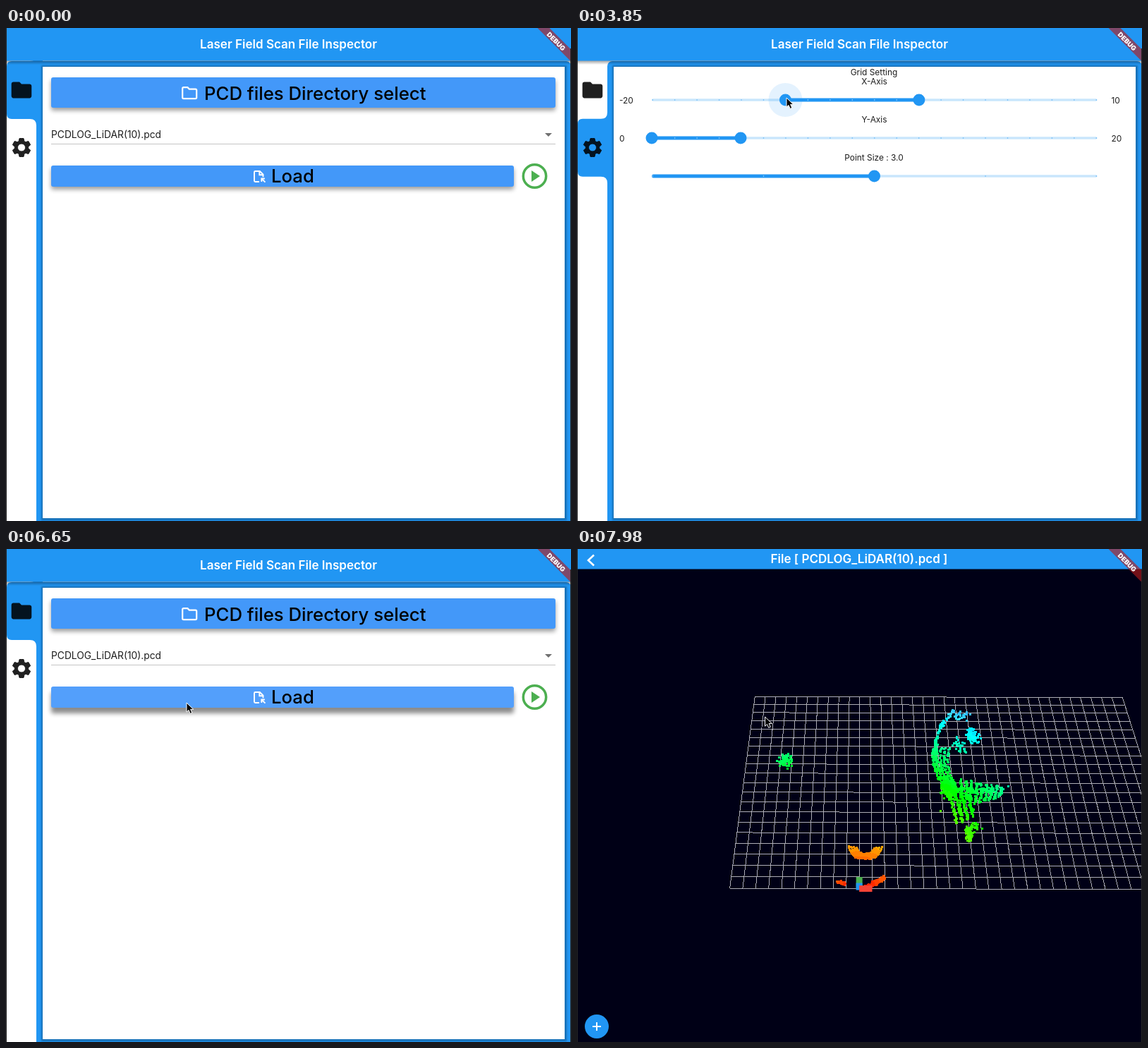
An HTML page that plays this animation: 801x699 px, repeating every 8 s.

```html
<!DOCTYPE html>
<html lang="en">
<head>
<meta charset="utf-8">
<title>Scan viewer</title>
<style>
  html, body { margin: 0; width: 100%; height: 100%; overflow: hidden; background: #fff; }
  svg { display: block; font-family: Inter, Roboto, sans-serif; }
  .mid { text-anchor: middle; }
  .bar { font-weight: 600; font-size: 17.05px; fill: #fff; }
  .big { font-weight: 500; font-size: 25.75px; }
  .small { font-size: 11.9px; fill: #1d1d1d; }
  .crisp { shape-rendering: crispEdges; }
</style>
</head>
<body>
<svg id="stage" width="801" height="699" viewBox="0 0 801 699">
  <defs>
    <filter id="soft" x="-5%" y="-60%" width="110%" height="260%"><feGaussianBlur stdDeviation="3"/></filter>
    <filter id="edge"><feGaussianBlur stdDeviation="1.3"/></filter>
    <linearGradient id="under" x1="0" y1="0" x2="0" y2="1">
      <stop offset="0" stop-color="#000" stop-opacity=".38"/>
      <stop offset="1" stop-color="#000" stop-opacity="0"/>
    </linearGradient>
  </defs>

  <g id="home">
    <rect width="801" height="699" fill="#fff"/>
    <rect x="43" y="47" width="758" height="670" rx="7" fill="#2196f3"/>
    <path id="tab" fill="#2196f3"/>
    <circle id="press" cx="28" cy="112" r="20" opacity=".07"/>
    <g opacity=".87">
      <path transform="translate(4.8 70.8) scale(1.43)" d="M10 4H4C2.9 4 2 4.9 2 6V18C2 19.1 2.9 20 4 20H20C21.1 20 22 19.1 22 18V8C22 6.9 21.1 6 20 6H12Z"/>
      <path id="gear" transform="translate(22 169.5)" fill-rule="evenodd" stroke="#000" stroke-width="1" stroke-linejoin="round"/>
    </g>
    <rect x="52" y="55" width="741" height="641" fill="none" stroke="#000" stroke-opacity=".26" stroke-width="4" filter="url(#edge)"/>
    <rect x="52" y="55" width="740" height="640" fill="#2196f3"/>

    <g id="pages">
      <g id="files">
        <rect x="52" y="55" width="740" height="640" fill="#fff"/>
        <rect x="64" y="74" width="715" height="43" rx="3" opacity=".38" filter="url(#soft)"/>
        <rect x="64" y="70" width="715" height="43" rx="3" fill="#4398f9"/>
        <path d="M250.2 85.8q0-1.6 1.6-1.6h5.6l2.4 2.4h8.8q1.6 0 1.6 1.6v10.4q0 1.6-1.6 1.6h-16.8q-1.6 0-1.6-1.6z" fill="none" stroke="#fff" stroke-width="2.2"/>
        <text class="big" x="281" y="101.5">PCD files Directory select</text>
        <text x="64" y="156" font-size="13.8" fill="#1d1d1d">PCDLOG_LiDAR(10).pcd</text>
        <rect x="64" y="164" width="715" height="1" fill="#c4c4c4"/>
        <path d="M764 149h10l-5 5z" fill="#707070"/>
        <rect id="loadShade" x="64" y="199" width="656" height="30" rx="3" filter="url(#soft)"/>
        <rect id="load" x="64" y="195" width="656" height="30" rx="3"/>
        <path d="M359 218h-5.6q-1.4 0-1.4-1.4v-12.2q0-1.4 1.4-1.4h6.4l4.7 4.7v3.6M359.3 203.5v4.7h4.7M367.5 218.7l-4.9-4.9M362.3 218v-4.5h4.6" fill="none" stroke="#fff" stroke-width="1.9"/>
        <text class="big" x="376" y="219.4">Load</text>
        <circle cx="749.5" cy="210" r="16.2" fill="none" stroke="#4caf50" stroke-width="3.5"/>
        <path d="M745 202v16l12-8z" fill="#4caf50"/>
      </g>
      <g id="settings">
        <rect x="52" y="55" width="740" height="640" fill="#fff"/>
        <g class="small">
          <g class="mid">
            <text x="421" y="66.7">Grid Setting</text>
            <text x="421.5" y="80.3">X-Axis</text>
            <text x="421.5" y="134.3">Y-Axis</text>
            <text x="421" y="188.3">Point Size : 3.0</text>
          </g>
          <text id="low" x="60" y="107.3"></text><text x="757.5" y="107.3">10</text>
          <text x="60" y="161.3">0</text><text x="757.5" y="161.3">20</text>
        </g>
        <g id="sliders"></g>
      </g>
    </g>
    <rect x="0" y="46" width="801" height="6" fill="url(#under)"/>
    <rect width="801" height="46.5" fill="#2196f3"/>
    <text class="bar mid" x="400.5" y="28.7">Laser Field Scan File Inspector</text>
  </g>

  <g id="viewer">
    <rect width="801" height="699" fill="#000016"/>
    <path id="grid" class="crisp" fill="none" stroke="#fff" stroke-opacity=".68"/>
    <g id="cloud" class="crisp"></g>
    <g id="axes"></g>
    <rect width="801" height="28.5" fill="#2196f3"/>
    <path d="M24 8.5L16 16l8 7.5" fill="none" stroke="#fff" stroke-width="2.6"/>
    <text class="bar mid" x="400" y="19.7">File [ PCDLOG_LiDAR(10).pcd ]</text>
    <circle cx="28" cy="677" r="17" fill="#2196f3"/>
    <path d="M22 677h12M28 671v12" stroke="#fff" stroke-width="2"/>
  </g>

  <path d="M753.5 0h17L801 30.5v17z" fill="#b71c1c" fill-opacity=".63"/>
  <text class="mid" transform="translate(780 19) rotate(45)" y="3.4" font-size="9.4" font-weight="900" fill="#fff">DEBUG</text>
  <path d="M.5 0V699M800.5 29V699" stroke="#262626"/>
  <path id="cursor" d="M0 0V13.2L3 10.4L5.2 15.4L7.8 14.3L5.6 9.4H9.8Z" stroke="#fff"/>
</svg>
<script>
const LOOP = 8000, BLUE = '#2196f3';
const $ = id => document.getElementById(id);
const clamp = v => Math.max(0, Math.min(1, v));
const ramp = (t, a, b) => clamp((t - a) / (b - a));
const smooth = u => u * u * (3 - 2 * u);
const mix = (a, b, u) => a + (b - a) * u;
const show = (el, on) => el.setAttribute('visibility', on ? 'visible' : 'hidden');

function set(el, attrs) {
  for (const k in attrs) el.setAttribute(k, attrs[k]);
  return el;
}
const add = (parent, tag, attrs) =>
  parent.appendChild(set(document.createElementNS('http://www.w3.org/2000/svg', tag), attrs));

// Gear icon: six teeth around a ring
function gearPath() {
  const pts = [];
  for (let i = 0; i < 6; i++)
    for (const a of [-23, -13, 13, 23]) {
      const q = (i * 60 - 90 + a) * Math.PI / 180, r = Math.abs(a) > 20 ? 9.8 : 13.3;
      pts.push(`${(r * Math.cos(q)).toFixed(2)} ${(r * Math.sin(q)).toFixed(2)}`);
    }
  return `M${pts.join('L')}ZM-5.5 0a5.5 5.5 0 1 0 11 0a5.5 5.5 0 1 0 -11 0Z`;
}
$('gear').setAttribute('d', gearPath());

// Sliders
const X0 = 106, X1 = 737.5;
const valueX = v => mix(X0, X1, (v + 50) / 100);

function slider(y, from, to, steps, single) {
  const g = $('sliders');
  add(g, 'rect', { x: X0, y: y - 1.75, width: X1 - X0, height: 3.5, rx: 1.7, fill: BLUE, opacity: .24 });
  const bar = add(g, 'rect', { y: y - 2.5, height: 5, rx: 2.5, fill: BLUE });
  const ticks = [];
  for (let i = 0; i <= steps; i++)
    ticks.push(add(g, 'circle', { cx: mix(X0 + 1.2, X1 - 1.2, i / steps), cy: y, r: .8 }));
  const halo = add(g, 'circle', { cy: y, fill: BLUE });
  const thumb = add(g, 'circle', { cy: y, r: 8.5, fill: BLUE });
  if (!single) add(g, 'circle', { cx: to, cy: y, r: 8.5, fill: BLUE });

  const update = (x, glow) => {
    set(bar, { x, width: to - x });
    set(thumb, { cx: single ? to : x });
    set(halo, { cx: x, r: 10 + 14 * glow, opacity: .12 * glow });
    for (const el of ticks) {
      const tx = +el.getAttribute('cx'), on = tx > x - 1 && tx < to;
      set(el, { fill: on ? '#fff' : BLUE, opacity: .63 });
    }
  };
  update(from, 0);
  return update;
}
const setX = slider(102, valueX(-10), valueX(10), 20);
slider(156, X0, 232, 20);
slider(210, X0, 421.5, 4, true);

// Point cloud, laid out in front-view pixels
let seed = 11;
const rnd = () => (seed = (seed * 16807) % 2147483647) / 2147483647;
const gauss = () => rnd() + rnd() + rnd() + rnd() - 2;
const UNIT = 16.87, DIST = 50.6, PIVOT = 7.56, MID = { x: 400.5, y: 365.1 };
const ORIGIN_Y = MID.y + PIVOT * UNIT;
const layers = new Map();

function dot(px, py) {
  const x = (px - MID.x) / UNIT, y = (ORIGIN_Y - py) / UNIT;
  const z = py < 425 && px > 450 ? (335 - py) / 190 + gauss() * .15 : 0;
  const hue = Math.round(Math.hypot(x, y) * 2) * 5;
  if (!layers.has(hue))
    layers.set(hue, { pts: [], el: add($('cloud'), 'path', { fill: `hsl(${hue},100%,${hue > 185 ? 60 : 50}%)` }) });
  layers.get(hue).pts.push([x, y, z]);
}

// Scatter n dots along a line that sags sideways by bend
function strand(x0, y0, x1, y1, bend, n, spread) {
  for (let i = 0; i < n; i++) {
    const u = rnd();
    dot(mix(x0, x1, u) + bend * 4 * u * (1 - u) + gauss() * spread, mix(y0, y1, u) + gauss() * spread);
  }
}
function blob(x, y, sx, sy, n) {
  for (let i = 0; i < n; i++) dot(x + gauss() * sx, y + gauss() * sy);
}

strand(546, 196, 515, 275, -10, 95, 2.4);
for (let i = 0; i < 5; i++) strand(511 + i * 6, 264, 523 + i * 4, 330, -6, 62 - i * 7, 1.3);
for (let i = 0; i < 4; i++) strand(529 + i * 8, 340, 537 + i * 8, 390 - i * 3, 1, 58 - i * 7, 1.6);
for (let i = 0; i < 9; i++) {
  const x = 544 + i * 7.3, h = 30 - i * 2.6;
  strand(x + 4, 337 - h * .6, x - 2, 337 + h, 2, 32 - i, 1.6);
}
strand(530, 337, 600, 338, 0, 90, 4);
strand(546, 250, 556, 270, 0, 30, 6);
blob(530, 334, 9, 13, 260);
blob(572, 243, 7, 12, 85);
blob(555, 206, 14, 9, 26);
blob(552, 406, 4, 10, 80);
blob(562, 394, 7, 7, 28);
blob(289, 284, 8, 9, 85);
dot(617, 328);
dot(515, 372);

// Nested bowls nearest the sensor
for (let k = 0; k < 4; k++)
  for (let u = -1; u <= 1; u += .035)
    dot(408.5 + u * (22.5 - k * 3.5), 448 - k * 2.2 - u ** 4 * (18 - k * 3) + gauss());
strand(372, 482, 382, 486, 0, 40, 1.7);
strand(408, 492, 433, 477, 0, 150, 2.6);

const axes = ['#4caf50', BLUE, '#f44336'].map(stroke => add($('axes'), 'path', { stroke, 'stroke-width': 9 }));

function drawScene(turned) {
  const tilt = turned * .575, roll = turned * .0027;
  const co = Math.cos(tilt), si = Math.sin(tilt);
  const proj = (x, y, z) => {
    const h = y - PIVOT, r = h - roll * x;
    const s = UNIT * DIST / (DIST + r * si - z * co);
    return [MID.x + (x + roll * h) * s, MID.y - (r * co + z * si) * s];
  };
  const at = (x, y) => proj(x, y, 0).map(v => v.toFixed(2)).join(' ');
  let d = '';
  for (let x = -10; x <= 25; x++) d += `M${at(x, 0)}L${at(x, 20)}`;
  for (let y = 0; y <= 20; y++) d += `M${at(-10, y)}L${at(25, y)}`;
  set($('grid'), { d });

  for (const { pts, el } of layers.values()) {
    const squares = pts.map(p => {
      const [x, y] = proj(...p);
      return `M${Math.round(x - 1.5)} ${Math.round(y - 1.5)}h3v3h-3z`;
    });
    set(el, { d: squares.join('') });
  }

  const o = proj(0, 0, 0), top = proj(0, 0, 1);
  set(axes[0], { d: `M${o}L${proj(0, 1, 0)}` });
  set(axes[1], { d: `M${o[0]} ${o[1] + 2}V${Math.min(o[1] - 2, top[1])}` });
  set(axes[2], { d: `M${o}H${proj(1, 0, 0)[0]}` });
}

// Pointer: each move is start, end, x, y; the drags come at an even beat
const drags = [0, 1, 2].map(i => 2450 + i * 840);
const moves = [
  [70, 840, 26, 186],
  [1170, 1680, 379, 97],
  [1750, 2170, 359, 97],
  ...drags.map((t, i) => [t, t + 400, 328 - i * 31, 98 + i]),
  [4690, 5020, 364, 217],
  [5020, 5460, 26, 110],
  [5900, 6650, 256, 218],
  [6720, 7000, 266.5, 294]
];
const orbit = t => 1 - (1 - ramp(t, 7100, 7980)) ** 2.3;

function pointer(t) {
  let x = 757, y = 582;
  for (const [a, b, toX, toY] of moves) {
    const u = smooth(ramp(t, a, b));
    x = mix(x, toX, u);
    y = mix(y, toY, u);
  }
  return [x, y - 56 * orbit(t)];
}

let lastTurn = -1;

function draw(t) {
  const [mx, my] = pointer(t);
  show($('cursor'), t >= 70);
  set($('cursor'), { transform: `translate(${mx.toFixed(1)} ${my.toFixed(1)})` });

  const p = ramp(t, 862, 1162) - ramp(t, 5845, 6145), y = 47 + 81.7 * p, b = y + 82;
  set($('tab'), {
    d: `M1 ${y + 7}Q1 ${y} 8 ${y}H34Q43 ${y} 43 ${y - 9}H52V${b + 9}H43Q43 ${b} 34 ${b}H8Q1 ${b} 1 ${b - 7}Z`
  });
  show($('press'), t >= 5740 && t < 5880);

  const front = t < 5845 ? $('settings') : $('files');
  if ($('pages').lastElementChild !== front) $('pages').appendChild(front);
  set($('settings'), { opacity: p });
  set($('files'), { opacity: 1 - p });

  const hover = mx > 64 && mx < 720 && my > 195 && my < 225 && p < .5;
  set($('load'), { fill: hover ? '#539ffb' : '#4398f9' });
  set($('loadShade'), { y: hover ? 203 : 199, opacity: hover ? .45 : .38 });

  const steps = drags.reduce((n, d) => n + ramp(t, d + 200, d + 275), 0);
  $('low').textContent = -10 - 5 * Math.ceil(steps);
  setX(valueX(-10 - 5 * steps), ramp(t, 2430, 2530) - ramp(t, 4660, 4800));

  const push = 1 - (1 - ramp(t, 6700, 6990)) ** 3;
  set($('home'), { transform: `translate(${-267 * push} 0)` });
  set($('viewer'), { transform: `translate(${801 * (1 - push)} 0)` });
  show($('viewer'), push > 0);
  const turned = orbit(t);
  if (turned !== lastTurn) drawScene(lastTurn = turned);
}

const start = performance.now();
function tick() {
  draw((performance.now() - start) % LOOP);
  requestAnimationFrame(tick);
}
draw(0);
requestAnimationFrame(tick);
</script>
</body>
</html>
```
